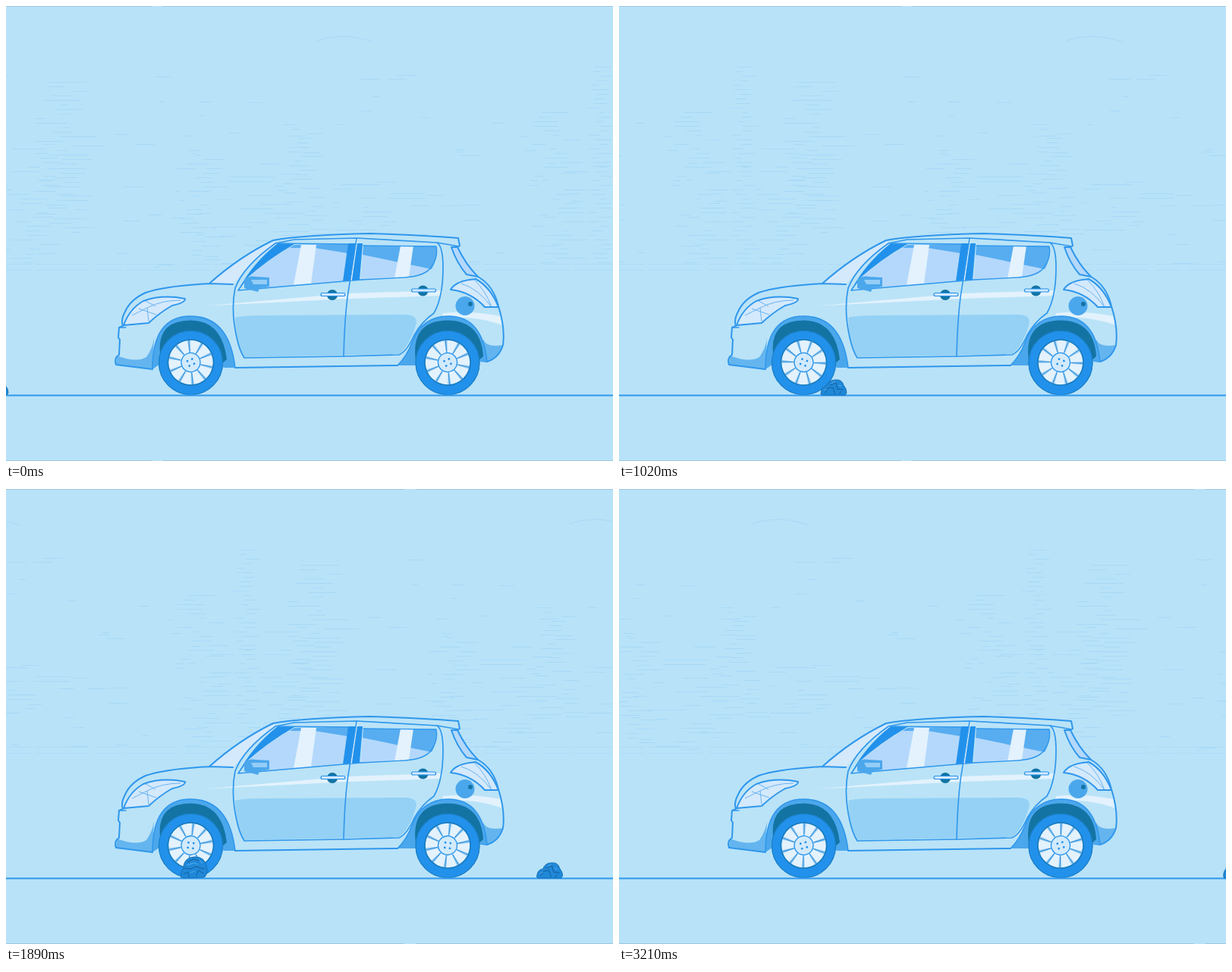
An HTML page for the animation above (3240 ms loop, 800x600 px).

```html
<!DOCTYPE html>
<html lang="en">
<head>
<meta charset="utf-8">
<title>Car on the road</title>
<style>
html, body { margin: 0; width: 100%; height: 100%; overflow: hidden; background: #b8e2f8; }
svg { display: block; width: 100vw; height: 100vh; }
.line { fill: none; stroke: #2f97ec; stroke-width: 2; stroke-linejoin: round; stroke-linecap: round; }
.thin { fill: none; stroke: #6ab4f0; stroke-width: 1; }
.body { fill: #bae3f7; }
.blue { fill: #2291eb; }
.mid { fill: #4ba7ec; }
.pale { fill: #d4e9fc; }
.white { fill: #e3f2fd; }
.glass { fill: #b4d8fb; }
.tint { fill: #57adf0; }
.panel { fill: #94d1f5; }
.teal { fill: #1374a4; }
</style>
</head>
<body>
<svg viewBox="0 0 800 600" preserveAspectRatio="none">
  <defs>
    <g id="skyline"></g>
    <g id="wheel">
      <circle r="30" fill="#9fd0f5"/>
      <g id="spokes"></g>
      <circle r="30" fill="none" stroke="#1679bb" stroke-width="1.5"/>
      <circle r="12.5" fill="#d2eafc" stroke="#2291eb" stroke-width="1.3"/>
      <g class="blue">
        <circle cx="-3.4" cy="-3.4" r="1.4"/><circle cx="3.4" cy="-3.4" r="1.4"/>
        <circle cx="-3.4" cy="3.4" r="1.4"/><circle cx="3.4" cy="3.4" r="1.4"/>
      </g>
    </g>
    <g id="tyre">
      <circle r="42.5" class="blue"/>
      <circle r="42" fill="none" stroke="#1b7fc5" stroke-width="1.2"/>
    </g>
  </defs>

  <rect width="800" height="600" fill="#b8e2f8"/>
  <g id="sky"><use href="#skyline"/><use href="#skyline" x="-800"/></g>
  <path d="M0 340.5H800M0 348.5H800" stroke="#a7d8f7" stroke-width="1" stroke-dasharray="34 5 70 9" opacity=".6"/>
  <path d="M0 .5H800M0 599.5H800" stroke="#9fc7df"/>
  <path id="gap" d="M0 .5H15M0 599.5H15" stroke="#b8e2f8" stroke-width="2"/>

  <!-- shell and shading -->
  <path class="body" d="M145 473 Q142 464 149 460 L150 440 L148 437 L149 424 L154 422 Q151 414 157 403 Q164 387 184 378 Q210 369 268 366 Q307 331 352 309 Q390 302 480 300 Q548 302 596 306 L598 316 L595 318 Q606 341 622 357 Q643 369 649 396 Q658 424 655 447 Q650 464 634 469 L516 474 L302 477 L193 479Z"/>
  <path fill="#64b5ef" d="M146 461 Q172 471 185 463 Q193 452 195 438 L193 479 L145 473Z"/>
  <path fill="#64b5ef" d="M629 440 Q634 451 655 447 Q650 464 634 469 L628 468Z"/>
  <path class="panel" d="M302 411 Q310 408 340 408 L528 407 Q544 408 540 421 Q532 448 518 459 L313 463 Q302 441 302 411Z"/>
  <path class="white" d="M262 395.5 L450 379 L575 375 L574 382 L452 386Z"/>
  <path class="white" d="M576 405 Q610 401 652 409 L654 421 Q622 408 574 411Z"/>
  <path class="pale" d="M268 366 Q307 331 352 310 L358 313 Q324 336 300 366Z"/>

  <!-- front window -->
  <path class="blue" d="M358 313 L380 314 Q342 336 318 359 L306 375 Q324 340 358 313Z"/>
  <path class="glass" d="M380 315 L452 314 L445 362 L320 373 L317 359 Q344 336 380 315Z"/>
  <path class="tint" d="M380 315 L452 314 L450 326 L407 319 L374 319Z"/>
  <path class="white" d="M389 315 L409 315 L402 366 L379 368Z"/>
  <path class="blue" d="M451 313 L470 313 L466 361 L444 363Z"/>
  <path class="line" style="stroke-width:1.6" d="M317 359 L306 375 L445 363 L468 361 M358 313 L452 314"/>

  <!-- rear window -->
  <path class="glass" d="M471 316 L567 317 Q570 331 560 345 Q552 356 526 358 L468 361Z"/>
  <path class="tint" d="M471 316 L567 317 Q570 331 561 347 L470 328Z"/>
  <path class="white" d="M520 316 L537 316 L531 357 L512 359Z"/>
  <path class="line" style="stroke-width:1.3" d="M471 316 L567 317 Q570 331 560 345 Q552 356 526 358 L468 361"/>

  <!-- doors -->
  <path class="line" style="stroke-width:1.7" d="M355 313 Q313 343 302 372 Q296 401 304 437 Q308 455 314 464 L445 462 L518 460 Q528 456 538 434 Q548 416 564 405 Q576 384 576 345 Q576 317 568 312 L462 306 L380 308 L355 313"/>
  <path d="M463 307 L455 362" stroke="#e3f2fd" stroke-width="1.5"/>
  <path class="line" style="stroke-width:1.6" d="M462 307 L450 384 Q446 416 445 462"/>

  <!-- mirror -->
  <path class="mid" d="M314 361 Q319 355 330 357 L347 358 L347 370 L334 372 L332 377 L314 372Z"/>
  <path d="M323 361H344V367H326Z" fill="#94cdf7"/>

  <!-- lamps and rear glass -->
  <path class="pale" d="M155 421 Q163 399 181 389 Q206 380 236 386 Q237 391 219 395 Q203 404 188 418Z"/>
  <path class="thin" d="M166 408 L186 398 L188 416M186 398 Q205 388 230 388M175 399 L198 407M184 389 L197 396"/>
  <path class="line" d="M155 421 Q163 399 181 389 Q206 380 236 386 Q237 391 219 395 Q203 404 188 418Z"/>
  <path class="glass" d="M587 318 L595 318 Q606 341 622 357 L607 354 Q594 339 587 318Z"/>
  <path class="line" d="M595 318 L587 318 Q594 339 607 354 L622 357"/>
  <path class="pale" d="M586 374 Q593 362 619 360 Q639 371 649 397 L631 397 Q613 377 586 374Z"/>
  <path class="thin" d="M600 366 Q623 373 640 397M617 361 Q632 375 640 397"/>
  <path class="line" d="M586 374 Q593 362 619 360 Q639 371 649 397 L631 397 Q613 377 586 374Z"/>
  <circle class="mid" cx="605" cy="395.5" r="12.5"/>
  <circle class="teal" cx="612" cy="393" r="3"/>

  <!-- handles -->
  <g id="handle">
    <circle class="teal" cx="430" cy="381" r="7"/>
    <rect x="415" y="378.5" width="32" height="4" rx="2" fill="#d4e9fc" stroke="#2291eb" stroke-width="1.2"/>
  </g>
  <use href="#handle" x="119.5" y="-5.5"/>

  <!-- outline -->
  <path class="line" d="M193 479 L145 473 Q142 464 149 460 L150 440 L148 437 L149 424 L154 422 Q151 414 157 403 Q164 387 184 378 Q210 369 268 366 Q307 331 352 309 Q390 302 480 300 Q548 302 596 306 L598 316 L595 318 Q606 341 622 357 Q643 369 649 396 Q658 424 655 447 Q650 464 634 469 L626 468M268 366 L299 367M302 477 L516 474"/>
  <path class="line" style="stroke-width:1.3" d="M149 424H158M568 312 L597 317"/>

  <!-- wheel arches -->
  <path class="mid" d="M193 479 Q193 409 243 409 Q294 409 302 477 L288 477 L243 462 L205 471Z"/>
  <path class="mid" d="M516 474 Q528 462 535 444 Q548 409 583 409 Q628 409 634 469 L622 468 L582 458 L540 474Z"/>
  <path class="teal" d="M203 458 Q199 415 243 414.5 Q285 415 291 466 L284 472 L243 460Z"/>
  <path class="teal" d="M540 468 Q533 415 582 414.5 Q626 415 629 462 L622 468 L582 460Z"/>
  <path class="line" style="stroke-width:1.5" d="M193 479 Q193 409 243 409 Q294 409 302 477M516 474 Q528 462 535 444 Q548 409 583 409 Q628 409 634 469"/>

  <use href="#tyre" x="243.5" y="470.5"/>
  <use href="#tyre" x="582" y="470.5"/>
  <g class="spin"><use href="#wheel"/></g>
  <g class="spin"><use href="#wheel"/></g>

  <path d="M0 513.5H800" stroke="#2f98ed" stroke-width="2"/>
  <g id="pebble">
    <path fill="#2088d8" stroke="#1570b5" d="M-17 512 Q-17 502 -9 501 Q-6 493 2 493 Q11 492 13 500 Q17 505 17 510 L15 513 L-15 513Z"/>
    <path fill="none" stroke="#135f9c" d="M-12 510 L-8 504 L-1 503 L2 512M-5 500 L3 497 L5 505 L13 506M7 512 L10 508"/>
    <path fill="none" stroke="#55aef0" d="M-3 498 L2 495M6 500 L10 501M-13 507 L-9 505"/>
  </g>
  <g id="boulder">
    <path fill="#2088d8" stroke="#1570b5" d="M-17 512 Q-18 505 -14 501 Q-14 486 1 485 Q15 485 17 499 Q19 506 14 512 L-15 513Z"/>
    <path fill="none" stroke="#135f9c" d="M-13 500 L-5 501 L3 498 L14 501M-14 508 L-8 505 L-6 512M3 510 L6 503 L13 507M-9 492 L0 488 L9 491"/>
    <path fill="none" stroke="#55aef0" d="M-9 496 L0 493 L5 495M7 489 L11 494M-4 506 L1 504"/>
  </g>
</svg>
<script>
const LOOP = 3240, STEP = 30;
const $ = id => document.getElementById(id);

let seed = 11;
const rand = () => (seed = seed * 16807 % 2147483647) / 2147483647;

// Faint hatched towers: x, y, width, height
const towers = [
  [365, 156, 65, 150], [225, 190, 62, 150], [0, 182, 92, 160], [765, 80, 35, 260],
  [430, 235, 130, 65], [30, 100, 110, 200], [690, 140, 80, 200], [270, 225, 150, 118]
];
let hatch = "M410 46Q420 41 447 40Q470 42 485 48";
for (const [x, y, w, h] of towers) {
  for (let row = y; row < y + h; row += 6) {
    hatch += `M${x + rand() * w * .6} ${row + .5}h${8 + rand() * w * .4}`;
  }
}
for (let i = 0; i < 70; i++) {
  hatch += `M${rand() * 780} ${Math.round(345 - 260 * rand() ** 1.4) + .5}h${6 + rand() * 22}`;
}
$("skyline").innerHTML = `<path d="${hatch}" fill="none" stroke="#8fcaf5" stroke-width="1" opacity=".4"/>`;

let blades = "";
for (let i = 0; i < 10; i++) {
  blades += `<g transform="rotate(${i * 36})"><path class="white" d="M-3 -12L-6.8 -28Q0 -30.5 6.8 -28L3 -12Z"/>` +
    `<path d="M4.2 -13L9 -28" stroke="#2f8fd8" stroke-width="1.1"/></g>`;
}
$("spokes").innerHTML = blades;

// Road distance over time, smoothed through a few points
const road = [[0, -14], [570, 114], [1020, 283], [1560, 529], [2310, 960], [2700, 1140], [3210, 1283]];
const slope = i => {
  const a = road[Math.max(i - 1, 0)], b = road[Math.min(i + 1, road.length - 1)];
  return (b[1] - a[1]) / (b[0] - a[0]);
};
function distance(t) {
  let i = 0;
  while (i < road.length - 2 && t > road[i + 1][0]) i++;
  const [t0, p0] = road[i], [t1, p1] = road[i + 1], d = t1 - t0, u = (t - t0) / d;
  const s = u * u * (3 - 2 * u);
  return p0 + (p1 - p0) * s + d * u * (1 - u) * (slope(i) * (1 - u) - slope(i + 1) * u);
}

const move = (el, x) => el.setAttribute("transform", `translate(${x})`);
const wheels = document.querySelectorAll(".spin");
const start = performance.now();

function draw() {
  const t = Math.floor((performance.now() - start) % LOOP / STEP) * STEP;
  const drift = t * .1762, d = distance(t);
  move($("sky"), drift % 800);
  move($("gap"), 192 + drift);
  move($("pebble"), d);
  move($("boulder"), d - 469);
  wheels.forEach((w, i) =>
    w.setAttribute("transform", `translate(${243.5 + i * 338.5} 470) rotate(${-23 - t / LOOP * 720})`));
  requestAnimationFrame(draw);
}
draw();
</script>
</body>
</html>
```
